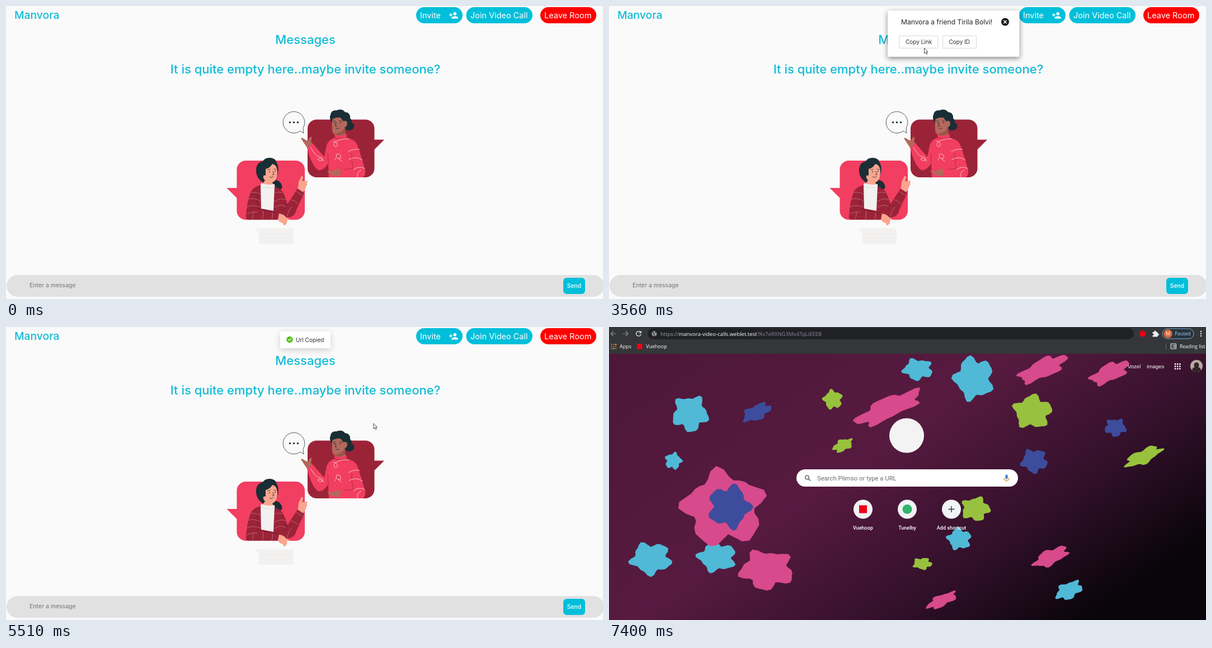
Recreate the animation shown at these times as an HTML page. Size 1067 px wide and 525 px high, loop 8 s.

```html
<!DOCTYPE html>
<html lang="en">
<head>
<meta charset="utf-8">
<title>Chat room invite</title>
<style>
  html, body { margin: 0; width: 100%; height: 100%; overflow: hidden; background: #fafafa; }
  svg { display: block; width: 100vw; height: 100vh; }
  text { font-family: Inter, sans-serif; }
  .head { fill: #12bbd6; font-size: 22px; font-weight: 500; text-anchor: middle; }
  .btn { fill: #fff; font-size: 14.5px; }
  .small { font-size: 10px; fill: #303030; }
  .choice rect { fill: #fff; stroke: #d9d9d9; }
  .choice.hover rect { stroke: #40a9ff; }
  .choice.hover text { fill: #40a9ff; }
  .choice.focus rect { stroke: #a9c9e6; }
  .choice.focus text { fill: #4c6e92; }
  #modal { filter: drop-shadow(0 3px 5px rgba(0,0,0,.45)); }
  #toast { filter: drop-shadow(0 3px 6px rgba(0,0,0,.18)); }
  .line { fill: none; stroke-linecap: round; stroke-linejoin: round; }
  #browser text { font-family: "Open Sans", sans-serif; font-size: 9px; fill: #fff; }
  #browser .url { font-size: 9.5px; fill: #9aa0a6; }
  #browser .web { font-family: "Liberation Sans", Arial, sans-serif; font-size: 9.5px; }
  #browser .tile { font-family: Roboto, sans-serif; font-size: 9px; font-weight: 500; text-anchor: middle; }
</style>
</head>
<body>
<svg viewBox="0 0 1067 525" preserveAspectRatio="none">
<g id="room">
  <rect width="1067" height="525" fill="#fafafa"/>
  <text x="15" y="23" class="head" style="font-size:19.3px;text-anchor:start">Manvora</text>
  <g fill="#00bfda">
    <rect x="733" y="2" width="83" height="29" rx="14.5"/>
    <rect x="822.5" y="2" width="118.500" height="29" rx="14.5"/>
    <rect x="955" y="2" width="100" height="29" rx="14.5" fill="#f00"/>
  </g>
  <g class="btn">
    <text x="740" y="22">Invite</text>
    <text x="830" y="22">Join Video Call</text>
    <text x="962" y="22">Leave Room</text>
    <path transform="translate(791.3 8) scale(.73)" d="M15 12a4 4 0 1 0 0-8 4 4 0 0 0 0 8zm-9-2V7H4v3H1v2h3v3h2v-3h3v-2zm9 4c-2.700 0-8 1.300-8 4v2h16v-2c0-2.700-5.300-4-8-4z"/>
  </g>
  <text x="535" y="68" class="head">Messages</text>
  <text x="535" y="121" class="head">It is quite empty here..maybe invite someone?</text>

  <!-- small chat bubbles -->
  <path d="M443 398.500H511q3 0 3 3V423q0 3-3 3H455q-3 0-3-3V405z" fill="#f2f1f0"/>
  <path d="M460 408.500h48M460 415.500h48" stroke="#e9e7e5" stroke-width=".8"/>
  <path class="line" d="M526 224A19.300 19.300 0 1 1 531 218.500L532 227.500z" stroke="#263238" stroke-width=".8"/>
  <g fill="#263238"><circle cx="507.500" cy="208.500" r="1.700"/><circle cx="514.500" cy="208.500" r="1.700"/><circle cx="521.500" cy="208.500" r="1.700"/></g>

  <!-- man -->
  <rect x="539" y="203.500" width="119.500" height="103.500" rx="16" fill="#9b2338"/>
  <path d="M658 239.500H676L658 257.500z" fill="#9b2338"/>
  <path d="M582 209Q577 200 580 195Q581 186 591 187Q600 183 606 190Q616 191 615 201Q619 205 618 209Q625 212 621 220Q615 225 608 222L600 200z" fill="#1a2e35"/>
  <path d="M584 201Q590 195 598 199L604 206Q610 205 610 211Q609 217 605 217L607 234Q597 239 589 233V230Q583 229 583 222Q582 210 584 201z" fill="#b3695c"/>
  <path d="M591 228Q599 227 605 219L606 228Q597 234 589 232z" fill="#9b544c"/>
  <path d="M585 203Q588 199 598 200Q601 205 604 207L604 197L592 193L583 197z" fill="#1a2e35"/>
  <path class="line" d="M585.500 206.500l3-1M596 205.500l4 1M590 209l-1.500 6h2.500M590 219.500q3-1.500 5 0" stroke="#1a2e35" stroke-width=".9"/>
  <circle cx="587.500" cy="209" r=".9" fill="#1a2e35"/><circle cx="597.500" cy="209" r=".9" fill="#1a2e35"/>
  <path d="M539 255Q534 248 527 237Q529 235 534 239L540 242Q541 235 546 234Q547 238 545 243L549 249z" fill="#b3695c"/>
  <path d="M587 230Q597 236 608 229L610 237Q625 239 629 252Q635 270 642 294Q643 305 637 307H577L576 282Q567 296 558 294Q546 286 538 254L548 246Q558 258 569 270L573 250Q576 239 588 236z" fill="#f23e60"/>
  <path class="line" d="M576 282L575 264M618 263Q617 278 621 291L604 293M587 236Q598 240 610 236" stroke="#b92a47" stroke-width="1"/>
  <path d="M598 292Q589 292 584 296L575 295Q574 298 579 300Q584 305 597 305z" fill="#b3695c"/>
  <path class="line" d="M613 238Q597 237 588 244Q584 249 588 252Q594 252 592 246Q588 242 585 242M544 253Q553 269 560 270Q567 271 566 276Q560 279 557 274Q561 270 568 278M588 276Q592 270 590 266Q594 263 598 268Q600 275 594 273Q589 270 600 278M612 261Q620 255 632 257M613 275Q626 268 637 276M621 293Q630 286 641 291M628 306Q627 297 635 294" stroke="#f8d2d6" stroke-width=".9"/>

  <!-- woman -->
  <rect x="412.500" y="277" width="121.500" height="106" rx="16" fill="#f23e60"/>
  <path d="M413 326H394.500L413 344.500z" fill="#f23e60"/>
  <path d="M463 318Q449 312 447 297Q446 281 459 278Q463 271 473 272Q482 273 484 281Q489 290 485 303Q483 309 479 311Q490 312 493 321Q495 327 490 329Q479 327 477 318z" fill="#1a2e35"/>
  <path d="M464 292Q471 291 476 283Q484 284 485 296Q485 313 476 316L478 321H457L463 312Q459 309 460 305Q461 302 464 304z" fill="#f9a58f"/>
  <path class="line" d="M468 293.500l4-1M479 292l4 1M477 296l2 6h-3M471 306q4 3 7-1" stroke="#263238" stroke-width=".9"/>
  <circle cx="471" cy="297" r=".9" fill="#263238"/><circle cx="481" cy="296" r=".9" fill="#263238"/>
  <path d="M456 317Q467 322 480 319L481 329L479 368L453 365V330z" fill="#f2f1ef"/>
  <path class="line" d="M455 323Q467 328 480 324" stroke="#d9d6d3" stroke-width=".8"/>
  <path d="M521 328Q523 320 523 315L528 305Q531 304 531 307L529 314L538 313Q541 315 537 317Q540 319 537 322Q535 330 529 335z" fill="#f9a58f"/>
  <path d="M455 321Q440 324 436 337Q430 354 429 376Q428 383 434 383H487L489 374Q501 382 511 377Q517 374 519 365L533 335L521 327L503 355Q496 330 488 327L480 323L478 367L456 363z" fill="#9b2338"/>
  <path class="line" d="M449 335L450 363L483 371M502 355L499 363" stroke="#741627" stroke-width="1"/>
  <path class="line" d="M438 334Q447 333 454 337M433 346Q444 343 454 349M430 360Q440 355 454 360M431 372Q441 368 449 369M440 382Q443 374 442 369M458 382Q461 373 459 367M475 382Q478 374 476 370M481 335Q488 332 494 335M480 350Q490 343 500 347M480 361Q491 353 500 360M503 377Q504 366 511 360M519 332Q524 337 530 339M510 347Q516 349 522 354" stroke="#c9858f" stroke-width=".7"/>
  <path d="M488 372Q497 373 501 379L507 382Q507 384 502 383Q504 389 498 393Q495 393 495 389Q488 388 486 382z" fill="#f9a58f"/>

  <rect x="1" y="482" width="1068" height="39" rx="19.500" fill="#e1e1e1"/>
  <text x="42" y="504" style="font-size:10.5px" fill="#757575">Enter a message</text>
  <rect x="996" y="487" width="39" height="29" rx="6" fill="#00bfda"/>
  <text x="1015.500" y="504.500" style="font-size:10.3px;font-weight:500" fill="#fff" text-anchor="middle">Send</text>

  <g id="modal">
    <rect x="498" y="8" width="235.500" height="83" rx="2" fill="#fff"/>
    <text x="522" y="33" style="font-size:12.1px" fill="#262626">Manvora a friend Tirila Bolvi!</text>
    <circle cx="708" cy="28.500" r="7" fill="#1c1c1c"/>
    <path d="M705.300 25.800l5.400 5.400m0-5.400l-5.400 5.400" stroke="#fff" stroke-width="1.500"/>
    <g id="link" class="choice"><rect x="519" y="53.500" width="69" height="22"/><text x="530" y="68" class="small">Copy Link</text></g>
    <g id="ident" class="choice"><rect x="596.500" y="53.500" width="60" height="22"/><text x="607.500" y="68" class="small">Copy ID</text></g>
  </g>
  <g id="toast">
    <rect x="490" y="8" width="90" height="30" rx="1.500" fill="#fff"/>
    <circle cx="507" cy="22.500" r="5.700" fill="#52c41a"/>
    <path class="line" d="M504.500 22.500l1.900 1.900 3.300-3.700" stroke="#fff" stroke-width="1.100"/>
    <text x="518" y="26.500" class="small">Url Copied</text>
  </g>
  <path id="arrow" d="M.5.500V10l2.200-2 1.700 3.400 1.600-.8-1.700-3.300H7z" fill="#fff" stroke="#222" stroke-width=".8"/>
  <path id="hand" d="M-1.300 8V1a1.300 1.300 0 0 1 2.600 0v4.500l4.500 1q1.500.4 1.400 1.800l-.8 5.700H.5L-3.500 9q0-1.700 2.200-1z" fill="#fff" stroke="#222" stroke-width=".8"/>
</g>

<g id="browser">
  <defs>
    <linearGradient id="dusk" x2="1" y2=".7">
      <stop offset="0" stop-color="#4c1738"/><stop offset=".5" stop-color="#571a40"/>
      <stop offset=".78" stop-color="#32102a"/><stop offset="1" stop-color="#0a050b"/>
    </linearGradient>
  </defs>
  <rect width="1067" height="525" fill="url(#dusk)"/>
  <g id="paint"></g>
  <rect width="1067" height="48" fill="#35363a"/>
  <rect x="69" y="2" width="869" height="20" rx="10" fill="#202124"/>
  <g class="line" stroke-width="1.200">
    <path d="M12 12H3.500m4-4l-4 4 4 4M25.500 12H34m-4-4l4 4-4 4" stroke="#8b8d91"/>
    <path d="M56.500 9.500A4.300 4.300 0 1 0 57 13.500M57.300 7.500v3h-3" stroke="#f1f3f4"/>
    <circle cx="81" cy="12" r="4.500" fill="#9aa0a6"/>
    <path d="M78 9.500l3 1.500-1 2 2 2.500M83 8.500l1 2" stroke="#202124"/>
  </g>
  <text x="92" y="15.500" class="url">https://<tspan fill="#fff">manvora-video-calls.weblet.test</tspan><tspan fill="#9187a0">?Kv7eRXNG3Mo4TqLiEEEB</tspan></text>
  <circle cx="953.500" cy="12" r="5.700" fill="#e60012"/>
  <path d="M971.500 9h3a1.700 1.700 0 1 1 3 0h3v3a1.700 1.700 0 1 1 0 3v2.500h-9v-3a1.500 1.500 0 1 0 0-2.500z" fill="#f1f3f4"/>
  <rect x="989" y="3" width="56" height="18" rx="9" fill="#27333d" stroke="#8ab4d8" stroke-width=".9"/>
  <circle cx="999" cy="12" r="7.800" fill="#d9673a"/>
  <text x="999" y="15.200" text-anchor="middle">M</text>
  <text x="1011" y="15" style="font-size:8.400px;fill:#a5cdf5">Paused</text>
  <g id="menu" fill="#f1f3f4"></g>
  <g id="apps"></g>
  <text x="19" y="38">Apps</text>
  <rect x="50" y="30" width="9.500" height="9.500" fill="#f00014"/>
  <text x="66" y="38">Vuehoop</text>
  <path d="M995.500 29v11" stroke="#66686c"/>
  <path class="line" d="M1004.500 30h9v9h-9zM1009 32.500h3m-3 2h3m-3 2h3M1006.300 32.500h.2m-.2 2h.2m-.2 2h.2" stroke="#f1f3f4"/>
  <text x="1020" y="38" style="font-size:8.500px">Reading list</text>
  <text x="927" y="74" class="web">Vozel</text>
  <text x="961" y="74" class="web">Images</text>
  <g id="launcher" fill="#fff"></g>
  <circle cx="1050" cy="70" r="11" fill="#b8aaa4"/>
  <path d="M1042 77.500Q1043 72 1047 72A4.500 5 0 1 1 1053 72Q1057 72 1058 77.500A11 11 0 0 1 1042 77.500z" fill="#302426"/>
  <circle cx="532" cy="194.500" r="31" fill="#f4f3f3"/>
  <rect x="335" y="255" width="396" height="31" rx="15.500" fill="#fff"/>
  <circle cx="354" cy="269.500" r="3.300" fill="none" stroke="#555" stroke-width="1.300"/>
  <path d="M356.500 272l3.500 3.500" stroke="#555" stroke-width="1.500"/>
  <text x="372" y="274.500" style="font-family:Roboto,sans-serif;font-size:11.300px;fill:#6b6b6b">Search Plimso or type a URL</text>
  <rect x="708.500" y="264.500" width="4" height="8" rx="2" fill="#3c78c8"/>
  <path class="line" d="M706 270.500q0 4.300 4.500 4.300t4.500-4.300M710.500 275v2" stroke="#c79a50" stroke-width="1.200"/>
  <g fill="#f1f3f4"><circle cx="454" cy="326.500" r="17"/><circle cx="533" cy="326.500" r="17"/><circle cx="612" cy="326.500" r="17"/></g>
  <rect x="447" y="319.500" width="14" height="14" fill="#f00014"/>
  <circle cx="533" cy="326.500" r="8.500" fill="#2fb56c"/>
  <path d="M606.500 326.500h11m-5.500-5.500v11" stroke="#333" stroke-width="1.400"/>
  <text x="454" y="363" class="tile">Vuehoop</text>
  <text x="533" y="363" class="tile">Tunelby</text>
  <text x="612" y="363" class="tile">Add shortcut</text>
</g>
</svg>
<script>
const LOOP = 8000;
const $ = id => document.getElementById(id);
const clamp = v => Math.max(0, Math.min(1, v));
const ease = v => 1 - (1 - clamp(v)) ** 3;
const show = (el, on) => { el.style.display = on ? "" : "none"; };

// Flat paint blotches behind the new tab page: x, y, rx, ry
const PAINT = {
  "#4fb9d6": [[145,155,30,30], [652,92,33,36], [75,415,34,27], [115,240,14,14], [552,76,25,18], [626,380,20,18], [193,412,32,25], [822,472,24,14]],
  "#d74a8c": [[205,325,68,62], [500,145,62,18], [282,435,45,33], [775,75,45,16], [895,82,36,15], [790,412,32,13], [595,490,28,10]],
  "#98c23e": [[757,152,32,28], [955,232,34,12], [655,326,24,20], [400,130,16,16], [418,212,18,10], [560,424,16,10]],
  "#3d4c9c": [[264,153,26,13], [215,322,35,36], [905,180,18,15], [760,240,22,20]]
};
function blotch(x, y, rx, ry) {
  let d = "";
  for (let i = 0; i < 40; i++) {
    const a = i * Math.PI / 20;
    const r = 1 + .16 * Math.sin(5 * a + x) + .08 * Math.sin(9 * a + y);
    d += (i ? "L" : "M") + (x + rx * r * Math.cos(a)) + " " + (y + ry * r * Math.sin(a));
  }
  const tilt = rx > 1.6 * ry ? -25 : 0;
  return `<path d="${d}z" transform="rotate(${tilt} ${x} ${y})"/>`;
}
$("paint").innerHTML = Object.entries(PAINT)
  .map(([color, list]) => `<g fill="${color}">${list.map(b => blotch(...b)).join("")}</g>`).join("");

function dots(id, cols, x, y, gap, r, colors = []) {
  for (let i = 0; i < cols * 3; i++) {
    const fill = colors.length ? ` fill="${colors[i % colors.length]}"` : "";
    $(id).innerHTML += `<circle cx="${x + i % cols * gap}" cy="${y + Math.floor(i / cols) * gap}" r="${r}"${fill}/>`;
  }
}
dots("menu", 1, 1058, 8, 4, 1.2);
dots("apps", 3, 4.5, 31.2, 3.8, 1.3, ["#e8453c", "#e8453c", "#f4b400", "#34a853", "#e8453c"]);
dots("launcher", 3, 1012, 66.5, 4.2, 1.4);

// Pointer moves: start, end, number of steps, points; no points hides it
const MOVES = [
  [0, 1, 2, []],
  [520, 920, 6, [[1058,514], [950,320], [870,200], [839,167]]],
  [1730, 1920, 4, [[839,151], [763,10]]],
  [2320, 2321, 2, [[763,13], [763,13]]],
  [2670, 3420, 11, [[763,14], [795,40], [802,90], [740,160], [640,215], [585,224], [566,190]]],
  [3490, 4260, 12, [[564,165], [563,75], [557,66], [556,65], [556,65], [560,66], [572,68], [595,70], [618,70], [628,68], [630,67], [630,67]]],
  [4330, 5100, 12, [[632,70], [640,80], [648,92], [640,104], [622,112], [600,113], [578,110], [558,106], [543,101], [543,90], [548,74], [552,67]]],
  [5170, 5930, 12, [[552,67], [553,68], [610,130], [780,285], [940,415], [1059,484]]],
  [6000, 6001, 2, []],
  [6740, 6741, 2, [[1051,518], [1051,518]]],
  [7070, 7071, 2, [[1033,514], [1033,514]]],
  [7140, 7141, 2, []]
];
function pointerAt(t) {
  const [start, end, steps, pts] = MOVES.findLast(m => m[0] <= t);
  if (!pts.length) return null;
  const step = Math.floor(clamp((t - start) / (end - start)) * (steps - 1) + .2);
  const pos = step / (steps - 1) * (pts.length - 1);
  const i = Math.min(Math.floor(pos + 1e-6), pts.length - 2);
  return pts[i].map((v, axis) => v + (pts[i + 1][axis] - v) * (pos - i));
}
const inside = (p, x, y, w, h) => p && p[0] >= x && p[0] <= x + w && p[1] >= y && p[1] <= y + h;

function zoom(el, cx, cy, scale, opacity) {
  el.setAttribute("transform", `translate(${cx} ${cy}) scale(${scale}) translate(${-cx} ${-cy})`);
  el.setAttribute("opacity", opacity);
  show(el, opacity > 0);
}

function draw(t) {
  show($("room"), t < 7400);
  show($("browser"), t >= 7400);

  const opened = ease((t - 2600) / 300), closed = ease((t - 5130) / 260);
  zoom($("modal"), 733, 16, (.2 + .8 * opened) * (1 - .8 * closed), opened * (1 - closed));
  const toast = ease((t - 5130) / 300);
  $("toast").setAttribute("transform", `translate(0 ${-20 * (1 - toast)})`);
  $("toast").setAttribute("opacity", toast);

  const p = pointerAt(t), modalOn = t >= 2670 && t < 5170;
  const onLink = modalOn && inside(p, 519, 53, 69, 21.5);
  const onIdent = modalOn && inside(p, 596, 53, 60, 21.5);
  const onInvite = inside(p, 733, 2, 83, 29);
  const hand = onLink || onIdent || onInvite;
  $("link").setAttribute("class", "choice" + (onLink ? " hover" : ""));
  $("ident").setAttribute("class", "choice" + (onIdent ? " hover" : t >= 4260 ? " focus" : ""));
  show($("arrow"), p && !hand);
  show($("hand"), p && hand);
  if (p) $(hand ? "hand" : "arrow").setAttribute("transform", `translate(${p})`);
}
function tick() {
  draw(performance.now() % LOOP);
  requestAnimationFrame(tick);
}
tick();
</script>
</body>
</html>
```
